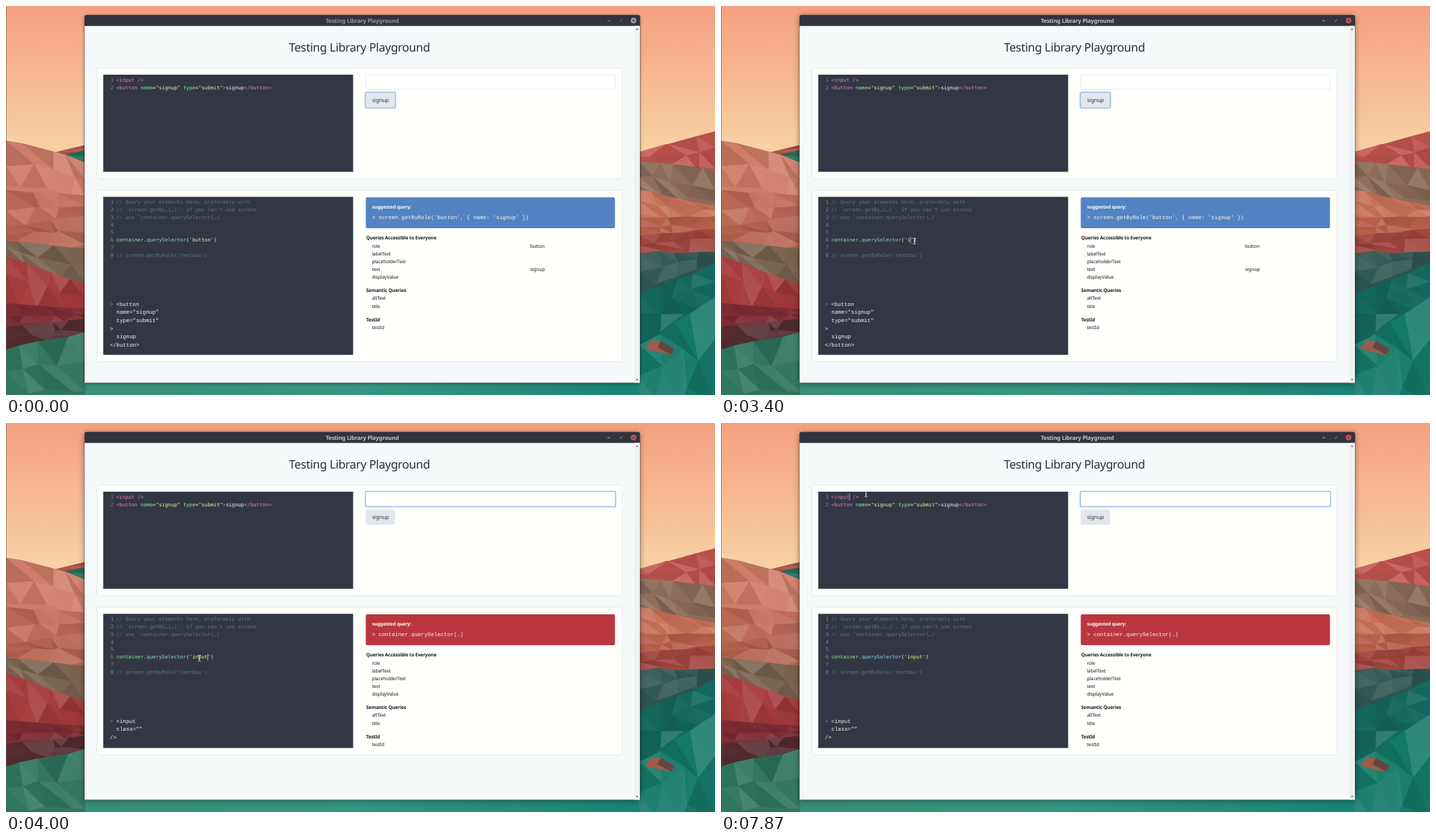
Write an HTML page that moves like this. It is 1010 px wide and 555 px high and loops after 8000 ms.

```html
<!DOCTYPE html>
<html lang="en">
<head>
<meta charset="utf-8">
<title>Testing Library Playground</title>
<style>
html, body { margin: 0; width: 100%; height: 100%; overflow: hidden; }
svg { display: block; width: 1010px; height: 555px; }
text { white-space: pre; text-rendering: geometricPrecision; }
.ui { font: 6.76px "Noto Sans", "Open Sans", sans-serif; letter-spacing: -.022em; fill: #16191e; }
.bold { font-weight: 700; }
.button { font-size: 7.8px; fill: #2d3748; }
.heading { font-size: 16.75px; fill: #2b303b; text-anchor: middle; }
.bar { font-size: 8.1px; font-weight: 700; text-anchor: middle; fill: #9296a0; }
.active { fill: #c3c7ce; }
.white { fill: #fff; }
.code { font: 7.214px "DejaVu Sans Mono", monospace; fill: #f4f4f0; }
.out { font: 7.76px "Liberation Mono", monospace; fill: #f8f8f4; }
.num { fill: #7b8798; }
.note { fill: #656f94; }
.tag { fill: #e07fc0; }
.attr { fill: #86ec9a; }
.str { fill: #eef39a; }
.prop { fill: #83d3e6; }
.card { fill: #fffffc; filter: drop-shadow(0 .6px .8px #0002); }
.editor { fill: #323743; }
.focus { stroke: #a5c4e8; stroke-width: 1.8; }
</style>
</head>
<body>
<svg viewBox="0 0 1010 555">
  <defs>
    <linearGradient id="sky" x2="0" y2="1">
      <stop stop-color="#f5a080"/><stop offset="1" stop-color="#f8d5a6"/>
    </linearGradient>
    <linearGradient id="water">
      <stop stop-color="#257059"/><stop offset=".12" stop-color="#399079"/>
      <stop offset=".5" stop-color="#349681"/><stop offset="1" stop-color="#117f6c"/>
    </linearGradient>
  </defs>
  <rect width="1010" height="220" fill="url(#sky)"/>
  <rect y="215" width="1010" height="340" fill="url(#water)"/>
  <g id="land"></g>
  <path d="M911 488L920 477 933 478 952 489 948 498 913 490Z" fill="#9f5b49"/>
  <path d="M928 487L933 478 952 489 948 498Z" fill="#68463f"/>
  <path d="M.5 0V555" stroke="#5558"/>
  <g id="scene"></g>
</svg>
<script>
const LOOP = 8000, ADVANCE = 4.343, CODE_X = 157, CODE_ROW = 10.83;
const TOP_ROW = 107.7, QUERY_ROW = 336.2;
const $ = id => document.getElementById(id);
const esc = s => s.replace(/&/g, '&amp;').replace(/</g, '&lt;');
const text = (x, y, s, cls) => `<text x="${x}" y="${y}" class="${cls}">${esc(s)}</text>`;
const rect = (x, y, right, bottom, attrs) =>
  `<rect x="${x}" y="${y}" width="${right - x}" height="${bottom - y}" ${attrs}/>`;
const path = (d, attrs) => `<path d="${d}" ${attrs}/>`;
const mix = (a, b, k) => a + (b - a) * k;

let seed = 7;
const random = () => (seed = seed * 16807 % 2147483647) / 2147483647;

// Low-poly strata: each ridge is a colour with its height at both ends.
function strata(left, right, ...ridges) {
  const COLS = 4, ROWS = 2;
  return ridges.map(([color, a, b], n) => {
    const [, c, d] = ridges[n + 1] || ['', 555, 555];
    const grid = Array.from({ length: ROWS + 1 }, (_, j) => Array.from({ length: COLS + 1 }, (_, i) => {
      const u = (i + (i % COLS ? random() - .5 : 0)) / COLS;
      const v = (j + (random() - .5) * (j ? .5 : .15)) / ROWS;
      return [mix(left, right, u), mix(mix(a, b, u), mix(c, d, u), v)];
    }));
    const facet = (...points) =>
      path(`M${points.join('L')}Z`, `fill="${random() < .55 ? '#000' : '#fff'}" fill-opacity="${random() * .13}"`);
    let out = path(`M${grid[0].join('L')}V555H${left}Z`, `fill="${color}"`);
    for (let j = 0; j < ROWS; j++)
      for (let i = 0; i < COLS; i++) {
        const p = grid[j][i], q = grid[j + 1][i + 1];
        out += facet(p, grid[j][i + 1], q) + facet(p, q, grid[j + 1][i]);
      }
    return out;
  }).join('');
}

$('land').innerHTML = strata(0, 113,
  ['#a84b43', 226, 198], ['#29725f', 230, 206], ['#cf7d68', 190, 222], ['#c06a58', 262, 270],
  ['#b4624f', 315, 300], ['#7a6350', 335, 345], ['#a43a3b', 355, 398], ['#7f2c34', 425, 432],
  ['#542c31', 458, 446], ['#2f755f', 490, 464])
  + strata(902, 1010,
  ['#c05450', 208, 178], ['#8c6b58', 222, 234], ['#c97258', 262, 285], ['#b9604c', 302, 300],
  ['#a0443e', 328, 318], ['#2d5450', 352, 350], ['#14695f', 410, 368], ['#147a68', 484, 420]);

const typedAt = [3400, 3465, 3530, 3730, 3800];

// Each move glides to a point; bend pushes the middle of the path sideways.
const start = { x: 65, y: 30 };
const moves = [
  { from: 800, to: 1400, x: 247.5, y: 344 },
  { from: 1600, to: 1930, x: 272.5, y: 339 },
  { from: 2530, to: 2600, x: 275.5, y: 335.5 },
  { from: 4230, to: 4930, x: 212, y: 107, bend: 74 },
  { from: 5000, to: 5130, x: 206.5, y: 101 },
];

// Every caret placement restarts the blink.
const carets = [
  { at: 2600, column: 27, y: QUERY_ROW },
  ...typedAt.map((at, i) => ({ at, column: 26 + i, y: QUERY_ROW })),
  { at: 5400, column: 9, y: TOP_ROW },
  { at: 6400, column: 7, y: TOP_ROW },
  { at: 7870, column: 6, y: TOP_ROW },
];

const results = {
  button: { bottom: 507, lines: ['<button', '  name="signup"', '  type="submit"', '>', '  signup', '</button>'],
    color: '#5283c2', query: "screen.getByRole('button', { name: 'signup' })", role: 'button', text: 'signup' },
  none: { bottom: 449, lines: ['null'] },
  input: { bottom: 473, lines: ['<input', '  class=""', '/>'],
    color: '#ba3641', query: 'container.querySelector(…)' },
};

// Tokens alternate class and text.
function code(y, number, ...tokens) {
  let spans = '';
  for (let i = 0; i < tokens.length; i += 2)
    spans += `<tspan class="${tokens[i]}">${esc(tokens[i + 1])}</tspan>`;
  return text(149, y, String(number), 'code num') + `<text x="${CODE_X}" y="${y}" class="code">${spans}</text>`;
}

function titleBar(active) {
  const ink = active ? '#c3c7ce' : '#9296a0';
  return `<g style="filter:drop-shadow(0 1px ${active ? 4 : 2}px #0006)">`
    + rect(111.7, 12.7, 903.3, 538, 'rx="3" fill="#2f343f"') + '</g>'
    + rect(112, 28.5, 903, 537.5, 'fill="#f5f9f9"')
    + text(507.5, 23.7, 'Testing Library Playground', 'ui bar' + (active ? ' active' : ''))
    + path('M856.7 21h3.6M874.6 22.4l2.8-2.8', `stroke="${ink}" stroke-width=".9"`)
    + `<circle cx="894" cy="20.8" r="4" fill="${active ? '#cc4f5a' : '#9a9da5'}"/>`
    + path('M892.5 19.3l3 3m0-3l-3 3', 'stroke="#2f343f" stroke-width=".9"')
    + rect(895, 28.5, 903, 537.5, 'fill="#f0f2f2"')
    + path('M897 34l2-2.2 2 2.2zM897 532l2 2.2 2-2.2z', 'fill="#70757a"');
}

function preview(focus) {
  const field = focus === 'input', button = focus === 'button';
  return rect(130, 89, 877, 245.5, 'rx="2" class="card"')
    + rect(138.5, 98, 494.5, 236.6, 'class="editor"')
    + code(TOP_ROW, 1, 'tag', '<input />')
    + code(TOP_ROW + CODE_ROW, 2, 'tag', '<button', 'attr', ' name', '', '=', 'str', '"signup"',
      'attr', ' type', '', '=', 'str', '"submit"', 'tag', '>', '', 'signup', 'tag', '</button>')
    + (field ? rect(511.8, 97.6, 868.4, 119.4, 'rx="2" fill="#fff" class="focus"')
      : rect(512.5, 98.2, 867.7, 118.7, 'rx="1.5" fill="#fff" stroke="#e0e5ea" stroke-width=".8"'))
    + (button ? rect(511.8, 123.2, 554.8, 145.6, 'rx="2.5" fill="#e2e7ec" class="focus"')
      : rect(512.3, 123.6, 554.3, 145, 'rx="2" fill="#e2e7ec"'))
    + text(521.5, 136.8, 'signup', 'ui button');
}

function queryEditor(word, result, selected) {
  const rows = [
    ['note', '// Query your elements here, preferably with'],
    ['note', "// `screen.getBy…(…)`. If you can't use screen"],
    ['note', '// use `container.querySelector(…)`.'],
    [], [],
    ['attr', 'container', '', '.', 'prop', 'querySelector', '', '(', 'str', `'${word}'`, '', ')'],
    [],
    ['note', "// screen.getByRole('textbox')"],
  ];
  return rect(130, 263.5, 877, result.bottom, 'rx="2" class="card"')
    + rect(138.5, 272.3, 494.5, result.bottom - 9.3, 'class="editor"')
    + (selected ? rect(265.5, 328, 291.6, 338.8, 'fill="#505663"') : '')
    + rows.map((tokens, i) => code(QUERY_ROW + (i - 5) * CODE_ROW, i + 1, ...tokens)).join('')
    + text(148, 427.6, '>', 'out num')
    + result.lines.map((s, i) => text(i ? 148 : CODE_X, 427.6 + i * 11.65, s, 'out')).join('');
}

function suggestions({ color, query, role = '', text: content = '' }) {
  if (!query) return '';
  const section = (y, title, ...names) => text(513, y, title, 'ui bold')
    + names.map((s, i) => text(521.2, y + (i + 1) * 11.1, s, 'ui')).join('');
  return rect(512.5, 273, 867.5, 317, `rx="2" fill="${color}"`)
    + text(521.5, 289, 'suggested query:', 'ui bold white')
    + text(521.5, 303.7, '> ' + query, 'out white')
    + section(333.4, 'Queries Accessible to Everyone', 'role', 'labelText', 'placeholderText', 'text', 'displayValue')
    + section(408.3, 'Semantic Queries', 'altText', 'title')
    + section(450, 'TestId', 'testId')
    + text(746.7, 344.5, role, 'ui') + text(746.7, 377.8, content, 'ui');
}

function caretMark(t) {
  const caret = carets.findLast(c => c.at <= t);
  if (!caret || (t - caret.at) % 1060 >= 530) return '';
  const x = CODE_X + caret.column * ADVANCE;
  return rect(x - .3, caret.y - 7.4, x + .4, caret.y + 2.6, 'fill="#d5d8dc"');
}

function pointer(t) {
  if (t < moves[0].from) return '';
  const tick = Math.floor(t * .015 + .01) / .015;
  let { x, y } = start;
  for (const move of moves) {
    const u = Math.min(1, Math.max(0, (tick - move.from) / (move.to - move.from)));
    const k = u * u * (3 - 2 * u);
    x = mix(x, move.x, k) + (move.bend || 0) * 4 * k * (1 - k);
    y = mix(y, move.y, k);
  }
  const overEditor = x > 139 && (y > 98 && y < 237 || y > 272);
  const shape = overEditor
    ? path('M-2-4.2Q0-4.2 0-3.2Q0-4.2 2-4.2M0-3.2V3.2M-2 4.2Q0 4.2 0 3.2Q0 4.2 2 4.2M-1 .8h2', 'fill="none" stroke="#e8e8e8" stroke-width=".9"')
    : path('M0 0V9.5L2.3 7.4 3.9 10.8 5.2 10.2 3.7 6.9H6.7Z', 'fill="#222" stroke="#fff" stroke-width=".7"');
  return `<g transform="translate(${x} ${y})">${shape}</g>`;
}

function scene(t) {
  const typed = typedAt.filter(s => s <= t).length;
  const word = typed ? 'input'.slice(0, typed) : 'button';
  const match = typed < 2 ? 'button' : t < 4000 ? 'none' : 'input';
  const result = results[match];
  const selected = t >= 2870 && !typed;
  return titleBar(t >= 2530)
    + text(503.5, 64.8, 'Testing Library Playground', 'ui heading')
    + preview(match)
    + queryEditor(word, result, selected)
    + suggestions(result)
    + (selected ? '' : caretMark(t))
    + pointer(t);
}

let shown = '';
function draw() {
  const markup = scene(performance.now() % LOOP);
  if (markup !== shown) $('scene').innerHTML = shown = markup;
  requestAnimationFrame(draw);
}
draw();
</script>
</body>
</html>
```
